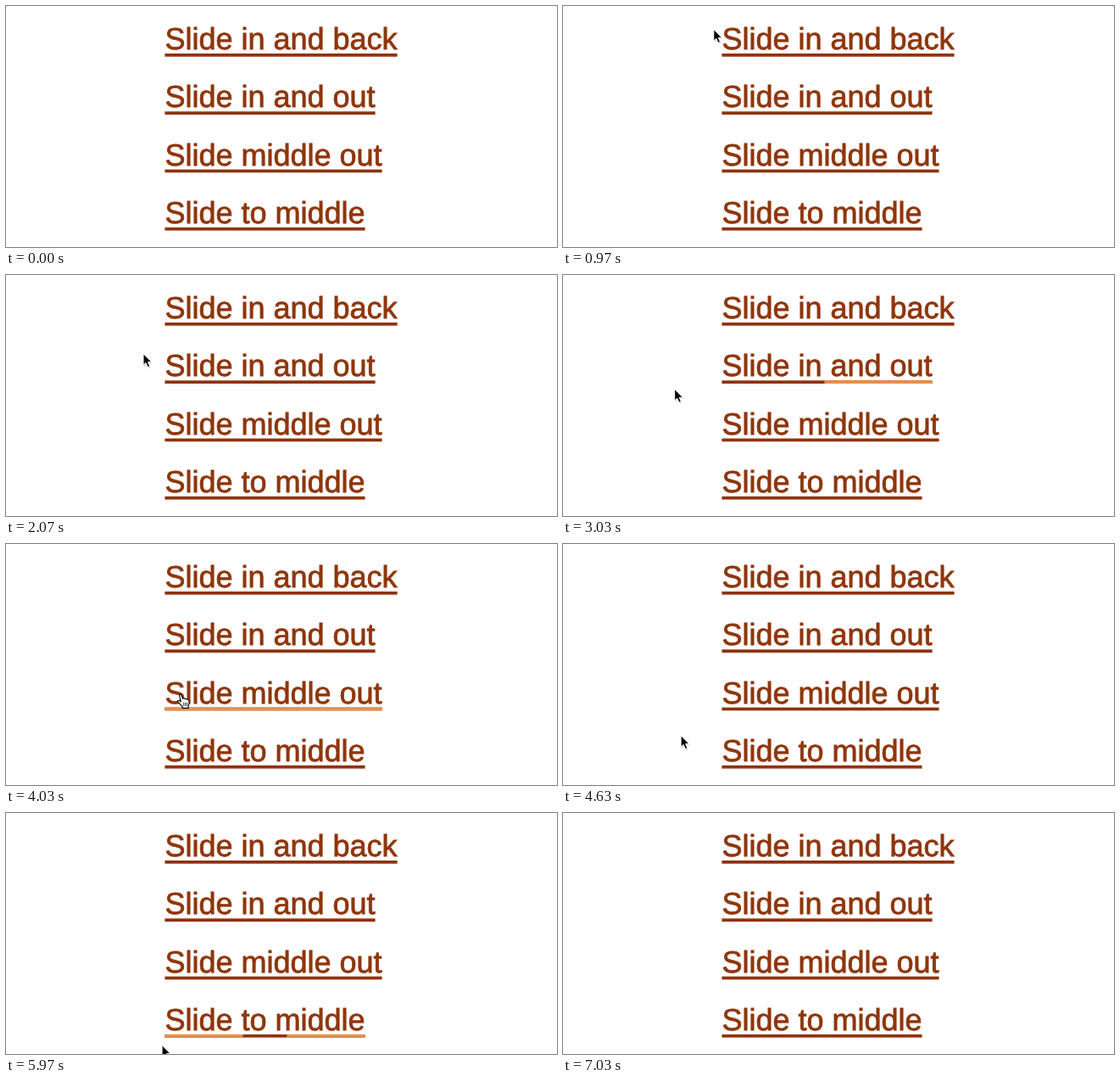
An HTML page for the animation above (7.33 s loop, 650 by 284 pixels).

```html
<!DOCTYPE html>
<html lang="en">
<head>
<meta charset="utf-8">
<title>Link underlines</title>
<style>
  html, body { margin: 0; width: 100%; height: 100%; overflow: hidden; background: #fff; }
  svg { display: block; width: 650px; height: 284px; }
  text {
    font: 36px "Liberation Sans", Arial, sans-serif;
    text-rendering: geometricPrecision;
    fill: #8f360c; stroke: #8f360c; stroke-width: .8px;
  }
  .line { fill: #8f330c; }
  .glow { fill: #e6914f; }
  #cursor path { stroke-linejoin: round; stroke-linecap: round; }
</style>
</head>
<body>
<svg viewBox="0 0 650 284">
  <g id="links"></g>
  <g id="cursor">
    <g id="arrow">
      <path d="M1 2V15L4 12L6.2 17L8.6 16L6.5 11.2H10.5Z" fill="#000" opacity=".18"/>
      <path d="M0 0V13.2L3 10.5L5.2 15.6L7.7 14.5L5.5 9.6H9.6Z" fill="#000" stroke="#fff"/>
    </g>
    <g id="hand">
      <path d="M-2 1.4Q-1.4 -.3 .2 .8L2 5.6Q3.2 4.4 4.4 5.8Q5.8 4.8 6.8 6.4Q9 6 9.4 8.2Q10.2 11.5 8.6 14V16.6H1.6V14.8Q-1 12.5 -4 9Q-4.2 7.2 -2.2 7.6L-.2 9.2Z"
            fill="#fff" stroke="#000" stroke-width="1.1"/>
      <path d="M3.2 10.5V14M5.2 10.5V14M7.2 10.5V14" fill="none" stroke="#000" stroke-width=".8"/>
    </g>
  </g>
</svg>
<script>
const LOOP = 7330, FADE = 185;
const LEFT = 187.4, TOP = 56, PITCH = 68.3, THICK = 3.7, BASE = 51;

// Glowing spans of the underline, as fractions of its width
const fromLeft = p => [[0, p]];
const toRight = p => [[1 - p, 1]];
const fromMiddle = p => [[.5 - p / 2, .5 + p / 2]];
const fromEnds = p => [[0, p / 2], [1 - p / 2, 1]];

const links = [
  { label: 'Slide in and back', enter: 1000, leave: 1838, show: fromLeft, hide: fromLeft },
  { label: 'Slide in and out', enter: 2250, leave: 2940, show: fromLeft, hide: toRight },
  { label: 'Slide middle out', enter: 3732, leave: 4360, show: fromMiddle, hide: fromMiddle },
  { label: 'Slide to middle', enter: 5211, leave: 5915, show: fromEnds, hide: fromEnds }
];

// Pointer stops: time, x, y
const stops = [
  [600, 3, 15], [1087, 207, 30], [1640, 207, 30], [2070, 162, 93],
  [2400, 206, 110], [2880, 206, 110], [3040, 131, 135], [4080, 207, 177],
  [4200, 207, 177], [4640, 139, 226], [4980, 139, 245], [5245, 205, 251],
  [5770, 205, 251], [6110, 172, 287]
];

const $ = id => document.getElementById(id);
const add = (tag, attrs) => {
  const el = document.createElementNS('http://www.w3.org/2000/svg', tag);
  for (const k in attrs) el.setAttribute(k, attrs[k]);
  return $('links').appendChild(el);
};
const ease = v => {
  v = Math.min(1, Math.max(0, v));
  return v * v * (3 - 2 * v);
};

links.forEach((l, i) => {
  const text = add('text', { x: LEFT, y: BASE + PITCH * i });
  text.textContent = l.label;
  l.y = TOP + PITCH * i;
  l.w = text.getComputedTextLength();
  add('rect', { class: 'line', x: LEFT, y: l.y, width: l.w, height: THICK });
  l.glow = add('path', { class: 'glow' });
});

function drawLink(l, t) {
  const p = ease((t - l.enter) / FADE) - ease((t - l.leave) / FADE);
  const spans = p > 0 ? (t < l.leave ? l.show : l.hide)(p) : [];
  l.glow.setAttribute('d', spans.map(([a, b]) =>
    `M${LEFT + a * l.w} ${l.y}h${(b - a) * l.w}v${THICK}h${(a - b) * l.w}z`).join(''));
}

function drawCursor(t) {
  const i = stops.findIndex(s => s[0] > t);
  $('cursor').style.display = i > 0 ? '' : 'none';
  if (i < 1) return;
  const [t0, x0, y0] = stops[i - 1], [t1, x1, y1] = stops[i];
  const u = ease((t - t0) / (t1 - t0));
  const x = x0 + (x1 - x0) * u, y = y0 + (y1 - y0) * u;
  const over = x >= LEFT && y < 266;
  $('cursor').setAttribute('transform', `translate(${x} ${y})`);
  $('arrow').style.display = over ? 'none' : '';
  $('hand').style.display = over ? '' : 'none';
}

const start = performance.now();
function frame() {
  const t = (performance.now() - start) % LOOP;
  links.forEach(l => drawLink(l, t));
  drawCursor(t);
  requestAnimationFrame(frame);
}
frame();
</script>
</body>
</html>
```
